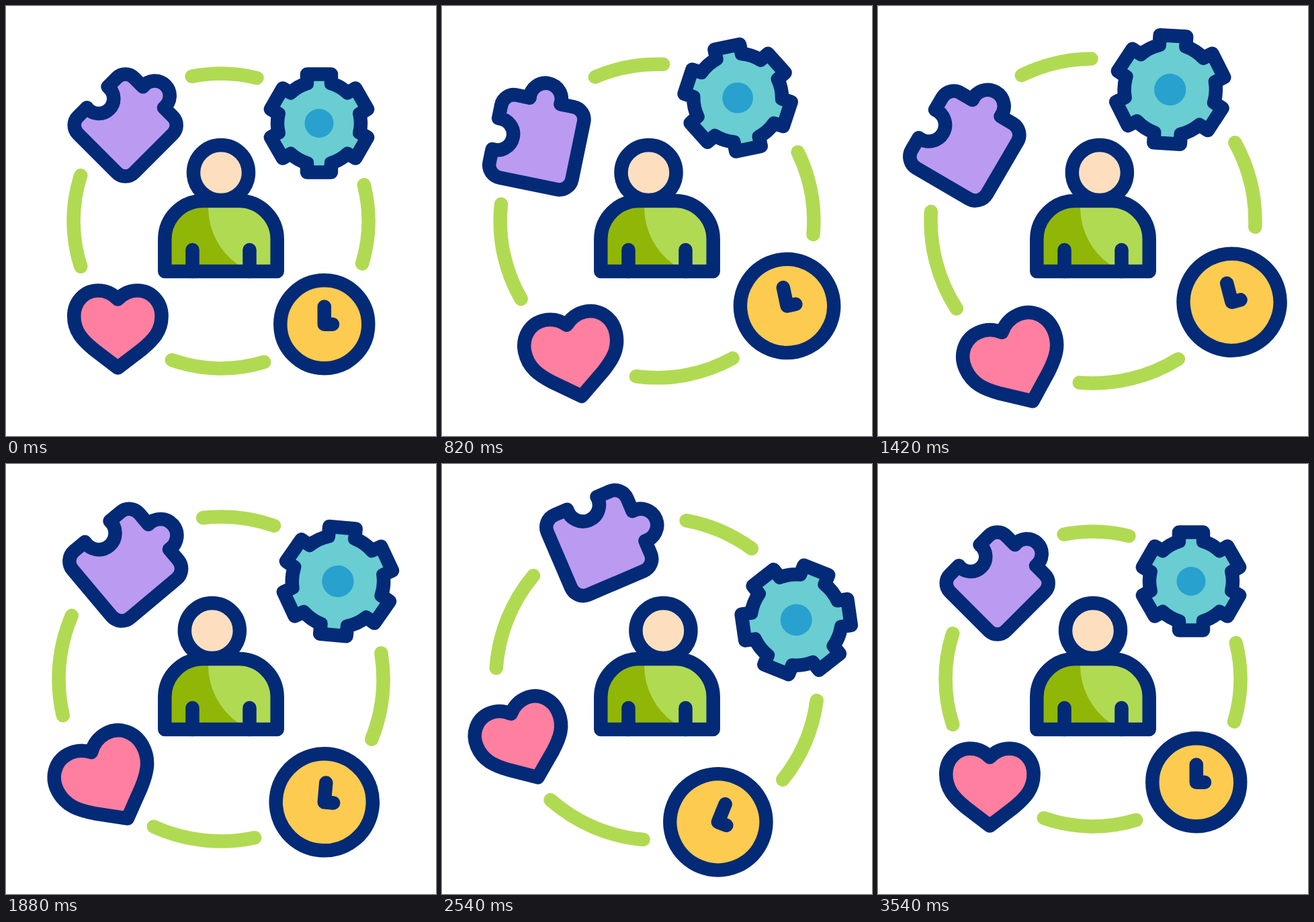
Animation of 640 by 640 pixels, one loop 3.6 s. Source, as an HTML page:

```html
<!DOCTYPE html>
<html lang="en">
<head>
<meta charset="utf-8">
<title>Skills wheel</title>
<style>
html, body { margin: 0; width: 100%; height: 100%; overflow: hidden; background: #fff; }
svg { display: block; width: 640px; height: 640px; }
.line { stroke: #032a76; stroke-width: 20.5; stroke-linecap: round; stroke-linejoin: round; }
.line * { vector-effect: non-scaling-stroke; }
.plain { stroke: none; }
#ring { fill: none; stroke: #b1da53; }
</style>
</head>
<body>
<svg viewBox="0 0 640 640">
  <defs>
    <path id="torso" d="M236.3 395V347A57 57 0 0 1 293.3 290H346.7A57 57 0 0 1 403.7 347V395Z"/>
  </defs>
  <g id="wheel" class="line">
    <path id="ring"/>
    <g id="puzzle"><path id="piece" fill="#bb9af2"/></g>
    <g id="gear">
      <path id="teeth" fill="#69cdd2"/>
      <circle class="plain" r="21.5" fill="#28a1ce"/>
    </g>
    <g id="heart">
      <path fill="#ff7fa1" d="M0-38.5C-8-47-18-51.5-29.5-51.5C-49.5-51.5-65.2-35-65.2-13.5C-65.2 9-53 22-36 36L0 63.5L36 36C53 22 65.2 9 65.2-13.5C65.2-35 49.5-51.5 29.5-51.5C18-51.5 8-47 0-38.5Z"/>
    </g>
    <g id="clock">
      <circle r="65.5" fill="#fdcb50"/>
      <path fill="none" d="M0-26.3V0H12.2"/>
    </g>
  </g>
  <g class="line">
    <circle id="head" cy="248" r="41" fill="#fddfbf"/>
    <use href="#torso" class="plain" fill="#b1da53"/>
    <path class="plain" fill="#90b608" d="M236.3 395V347A57 57 0 0 1 293.3 290H301V300A105 105 0 0 0 345 385V395Z"/>
    <use href="#torso" fill="none"/>
    <path d="M277.5 363V395M362.5 363V395"/>
  </g>
</svg>
<script>
const LOOP = 3600, STEP = 20;
const START = 220, LEFT = 1240, RIGHT = 2340, END = 3540;
const $ = id => document.getElementById(id);

// Shapes
const polar = (r, deg) => {
  const a = deg * Math.PI / 180;
  return `${(r * Math.cos(a)).toFixed(2)} ${(r * Math.sin(a)).toFixed(2)}`;
};
const arc = (r, from, to) => `M${polar(r, from)}A${r} ${r} 0 0 1 ${polar(r, to)}`;

function piecePath(half, round, knob, neck) {
  const h = half, s = half - round;
  const corner = (x, y) => `A${round} ${round} 0 0 1 ${x} ${y}`;
  return `M${-h} ${-s}${corner(-s, -h)}H${-neck}A${knob} ${knob} 0 1 1 ${neck} ${-h}H${s}`
    + `${corner(h, -s)}V${s}${corner(s, h)}H${-s}${corner(-h, s)}V${neck}`
    + `A${knob} ${knob} 0 1 0 ${-h} ${-neck}Z`;
}

function gearPath(count, root, tip, half) {
  const inner = Math.asin(half / root) * 180 / Math.PI;
  const outer = Math.atan(half / tip) * 180 / Math.PI;
  const reach = Math.hypot(half, tip);
  let d = '';
  for (let i = 0; i < count; i++) {
    const a = i * 360 / count - 90, next = a + 360 / count;
    d += `${i ? 'L' : 'M'}${polar(root, a - inner)}L${polar(reach, a - outer)}`
      + `L${polar(reach, a + outer)}L${polar(root, a + inner)}`
      + `A${root} ${root} 0 0 1 ${polar(root, next - inner)}`;
  }
  return d + 'Z';
}

$('ring').setAttribute('d', arc(219.5, 162, 198) + arc(219.5, 258.6, 284.1)
  + arc(219.5, -14.2, 16.8) + arc(219.5, 73, 109.5));
$('piece').setAttribute('d', piecePath(59, 18, 22.2, 22));
$('teeth').setAttribute('d', gearPath(6, 62, 72.9, 18));

// Motion
const ramp = (t, a, b) => Math.min(1, Math.max(0, (t - a) / (b - a)));
const ease = (t, a, b) => {
  const u = ramp(t, a, b);
  return u * u * (3 - 2 * u);
};
const bump = (t, a, peak, b) => ease(t, a, peak) - ease(t, peak, b);

function place(id, x, y, angle = 0, size = 1) {
  $(id).setAttribute('transform', `translate(${x} ${y}) rotate(${angle}) scale(${size})`);
}

function swing(t) {
  return -22.4 * ramp(t, START, LEFT) ** 1.2
    + 47.1 * ramp(t, LEFT, RIGHT)
    - 24.7 * ease(t, RIGHT - 40, END - 100);
}

function nod(t) {
  const from = 760, beat = 1110, to = from + 2 * beat;
  const sway = Math.cos(2 * Math.PI * ramp(t, from, to) * 2);
  return -(0.6 + 12.6 * sway) * bump(t, START, from, from + 1)
    || -(0.6 + 12.6 * sway) * (ease(t, START, from) - ease(t, to, END));
}

function draw(t) {
  place('wheel', 320, 320, swing(t), 1 + 0.1 * (ease(t, START, LEFT) - ease(t, RIGHT, END)));
  place('puzzle', -142.3, -142.5, 45 - 22 * bump(t, START, 770, 1320));
  place('gear', 146, -145.5, 60 * ease(t, 1180, 1840));

  const tilt = bump(t, 1050, 2350, END);
  const shrink = bump(t, 2000, 2950, END);
  place('heart', -153.6 + 12.6 * tilt, 155 - 12.6 * tilt, -48 * tilt, 1 - 0.13 * shrink);

  const push = bump(t, 2700, 3080, END);
  const out = 153.8 + 9 * push - 4 * bump(t, 2300, 2540, 2800);
  place('clock', out, out, 0, 1 + 0.06 * push);

  $('head').setAttribute('cx', 320 + nod(t));
}

function tick() {
  const t = performance.now() % LOOP;
  draw(t - t % STEP);
  requestAnimationFrame(tick);
}
tick();
</script>
</body>
</html>
```
